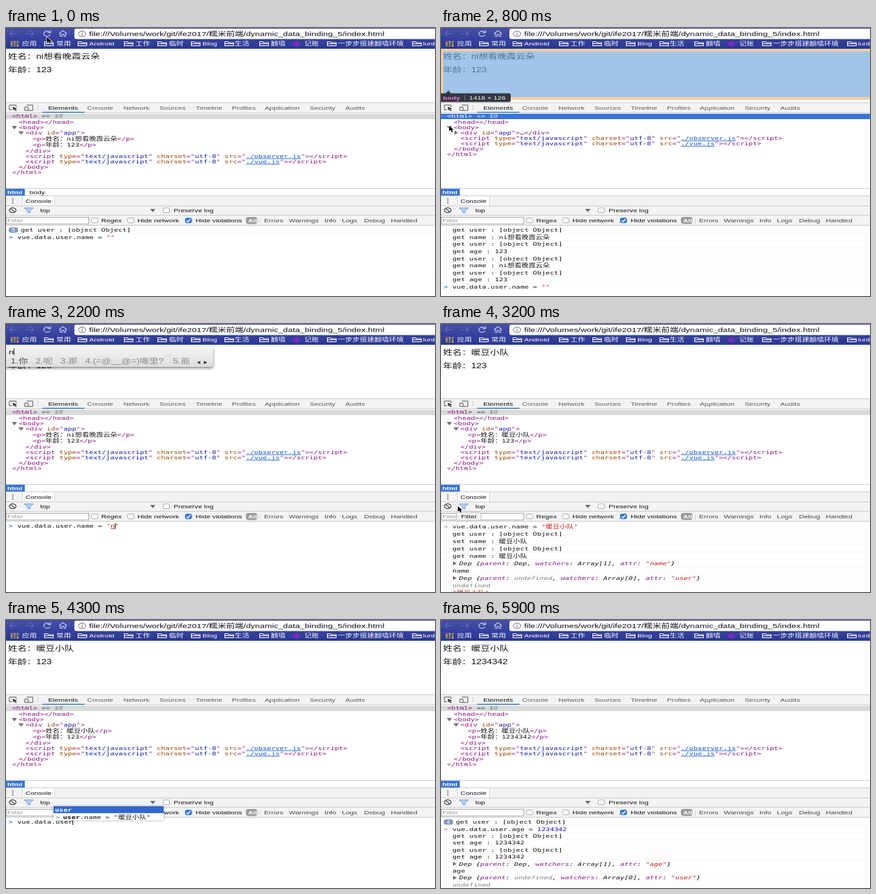
These frames come from a looping animation (640 px wide and 400 px high, 6 s). An HTML page with a canvas:

```html
<!DOCTYPE html>
<html lang="zh-CN">
<head>
<meta charset="utf-8">
<title>Data binding demo</title>
<style>
html, body { margin: 0; width: 100%; height: 100%; overflow: hidden; background: #fff; }
canvas { display: block; width: 640px; height: 400px; }
</style>
</head>
<body>
<canvas width="640" height="400"></canvas>
<script>
const ctx = document.querySelector('canvas').getContext('2d');
const LOOP = 6000, STEP = 100;
const WIDEN = 1.4;
const SANS = '"Liberation Sans", "Noto Sans CJK SC", "Noto Sans CJK", sans-serif';
const MONO = '"DejaVu Sans Mono", "Noto Sans CJK SC", "Noto Sans CJK", monospace';
const PURPLE = '#881280', BROWN = '#994500', NAVY = '#1a1aa6', RED = '#c41a16';
const GREY = '#808080', INK = '#111', LINE = '#ccc', BLUE = '#3879d9';
const FIRST_NAME = 'ni想看晚霞云朵', NEW_NAME = '暖豆小队';

// ---- drawing helpers ----
function box(x, y, w, h, color) {
  ctx.fillStyle = color;
  ctx.fillRect(x, y, w, h);
}

function round(x, y, w, h, r, fill, stroke) {
  ctx.beginPath();
  ctx.roundRect(x, y, w, h, r);
  if (fill) { ctx.fillStyle = fill; ctx.fill(); }
  if (stroke) { ctx.strokeStyle = stroke; ctx.lineWidth = 1; ctx.stroke(); }
}

function shape(d, x, y, fill, stroke, width = 1) {
  const path = new Path2D(d);
  ctx.save();
  ctx.translate(x, y);
  if (stroke) { ctx.strokeStyle = stroke; ctx.lineWidth = width; ctx.stroke(path); }
  if (fill) { ctx.fillStyle = fill; ctx.fill(path); }
  ctx.restore();
}

// Draws text centred on y and returns the x where it ends.
function text(s, x, y, color = INK, size = 7.6, font = SANS, style = '') {
  ctx.font = `${style} ${size}px ${font}`;
  ctx.fillStyle = color;
  ctx.save();
  ctx.translate(x, y + size * 0.35);
  ctx.scale(WIDEN, 1);
  ctx.fillText(s, 0, 0);
  ctx.restore();
  return x + ctx.measureText(s).width * WIDEN;
}

// Parts are [text, color, underlined].
function run(parts, x, y, style) {
  for (const [s, color, underlined] of parts) {
    const end = text(s, x, y, color, 7.5, MONO, style);
    if (underlined) box(x, y + 3.6, end - x, 0.8, color);
    x = end;
  }
  return x;
}

const triangle = (x, y, open, color = '#6e6e6e') =>
  shape(open ? 'M-4-2H4L0 3Z' : 'M-2.5-3L3 0L-2.5 3Z', x, y, color);

function checkbox(x, y, on) {
  round(x - 4.5, y - 3.5, 9.5, 7, 2, on ? BLUE : '#fff', on ? BLUE : '#aaa');
  if (on) shape('M-2.5 0L-.5 2L3-2', x, y, null, '#fff', 1.3);
}

function cursor(x, y) {
  shape('M0 0V8L2.4 6.3L4 9.5L5.8 9L4.2 5.7H7Z', x, y, '#000', '#fff', 1.2);
}

// ---- browser ----
function folder(x) {
  shape('M.5 7V1H5L6.5 2.5H13.5V7ZM.5 4H13.5', x, 19.5, null, '#fff', 1.1);
}

function browserBar() {
  const bar = ctx.createLinearGradient(0, 0, 0, 31);
  bar.addColorStop(0, '#4650a5');
  bar.addColorStop(0.5, '#3642a0');
  bar.addColorStop(1, '#2b3890');
  box(0, 0, 640, 31, bar);
  shape('M6 0H-5M-1-4L-5 0L-1 4', 11, 8.5, null, '#626cb8', 1.2);
  shape('M-6 0H5M1-4L5 0L1 4', 36, 8.5, null, '#626cb8', 1.2);
  shape('M4.5-2A5 3.8 0 1 0 5 1.5M5.5-5V-1.5H1', 61, 8.5, null, '#c5caef', 1.2);
  shape('M-6 0L0-4.5L6 0M-4-1V4H-1.5V1H1.5V4H4V-1', 85, 8.5, null, '#c5caef', 1.1);
  round(102, 1, 550, 15.5, 3, '#fff');
  shape('M-5.5 0A5.5 4 0 1 0 5.5 0A5.5 4 0 1 0-5.5 0M0-.7V2.4M0-2.5V-1.5', 113.5, 8.7, null, '#666');
  text('file:///Volumes/work/git/ife2017/糯米前端/dynamic_data_binding_5/index.html', 124, 8.7, INK, 9.25);

  const dots = ['#ee6a5f', '#f5bd4f', '#61c454'];
  for (let i = 0; i < 9; i++) box(7 + i % 3 * 4.4, 19.5 + (i / 3 | 0) * 3, 3, 2, dots[(i + (i / 3 | 0)) % 3]);
  const marks = [['应用', 24], ['常用', 75, 57], ['Android', 124, 107], ['工作', 193, 176], ['临时', 243, 226],
    ['Blog', 293, 276], ['生活', 341, 326], ['翻墙', 395, 378], ['记账', 445],
    ['一步步搭建翻墙环境', 495, 479], ['lunB', 622, 606]];
  for (const [label, x, icon] of marks) {
    text(label, x, 23.5, '#fff', 7.8, SANS, '500');
    if (icon) folder(icon);
  }
  ctx.beginPath();
  ctx.ellipse(433, 23.5, 5.5, 4.3, 0, 0, 7);
  ctx.fillStyle = '#6d2fbd';
  ctx.fill();
}

function page(name, age) {
  text('姓名：' + name, 3, 42, INK, 10);
  text('年龄：' + age, 3, 62, INK, 10);
}

function highlight() {
  const margin = 'rgba(246,178,107,.66)';
  box(0, 31, 640, 4, margin);
  box(0, 103, 640, 4, margin);
  box(0, 35, 3, 68, margin);
  box(3, 35, 637, 68, 'rgba(111,168,220,.66)');
  shape('M-6 4L0-2L6 4Z', 11, 95.5, '#333740');
  round(-4, 97.5, 108, 13, 2, '#333740');
  text('body', 3, 104, '#ee78e6', 7.6, SANS, 'bold');
  box(35, 100, 0.8, 8, '#888');
  text('1418 × 126', 42, 104, '#fff', 7.7);
}

function inputMethod(typed) {
  ctx.save();
  ctx.shadowColor = 'rgba(0,0,0,.5)';
  ctx.shadowBlur = 4;
  ctx.shadowOffsetY = 2;
  const bg = ctx.createLinearGradient(0, 34, 0, 64);
  bg.addColorStop(0, '#f6f6f6');
  bg.addColorStop(1, '#dcdcdc');
  round(-3, 34, 312, 30, 3, bg);
  ctx.restore();
  const end = text(typed, 4, 41.5, '#111', 9.5);
  box(end, 36.5, 1, 10, '#000');
  const first = typed === 'n';
  const words = first ? ['你', '呢', '那', '(=@__@=)哪里?', '能'] : ['暖', '暖豆', '暖和', '暖洋洋的日子', '嫩'];
  [7, 44, 81, 118, 249].forEach((x, i) => text(`${i + 1}.${words[i]}`, x, 55.5, i ? '#8c8c8c' : '#555', 10));
  shape('M3-2.5L-2.5 0L3 2.5ZM8-2.5L13.5 0L8 2.5Z', 287, 57.5, '#444');
}

// ---- elements panel ----
const attr = (name, value, link) =>
  [[' ' + name, BROWN], ['="', PURPLE], [value, link ? '#1155cc' : NAVY, link], ['"', PURPLE]];
const open = (tag, ...attrs) => [['<' + tag, PURPLE], ...attrs.flat(), ['>', PURPLE]];
const close = tag => [[`</${tag}>`, PURPLE]];
const plain = (s, color = INK) => [[s, color]];
const script = file => [...open('script', attr('type', 'text/javascript'), attr('charset', 'utf-8'),
  attr('src', file, true)), ...close('script')];

function elementRows(depth, name, age) {
  const rows = [{ x: 19, parts: [...open('head'), ...close('head')] }];
  const app = open('div', attr('id', 'app'));
  const add = (x, parts, arrow) => rows.push({ x, parts, arrow });
  if (!depth) {
    add(19, [...open('body'), ...plain('…'), ...close('body')], 'closed');
  } else {
    add(19, open('body'), 'open');
    if (depth === 1) {
      add(29, [...app, ...plain('…'), ...close('div')], 'closed');
    } else {
      add(29, app, 'open');
      for (const s of ['姓名：' + name, '年龄：' + age]) add(40, [...open('p'), ...plain(s), ...close('p')]);
      add(29, close('div'));
    }
    add(29, script('./observer.js'));
    add(29, script('./vue.js'));
    add(19, close('body'));
  }
  add(9, close('html'));
  return rows;
}

// Chinese glyphs make a row taller.
const rowHeight = parts => parts.some(([s]) => /[\u4e00-\u9fff]/.test(s)) ? 9.3 : 8.1;

function elementsPanel(s) {
  box(0, 112, 640, 15, '#f3f3f3');
  box(0, 111, 640, 1, LINE);
  box(0, 126, 640, 1, LINE);
  shape('M-1 3H-5V-4H5V-1', 10, 119, null, '#555');
  shape('M0-1.5L7 1.5L4 2L6 4.5L4.5 5L2.5 2.5L1 4Z', 10, 119, '#333');
  shape('M-3-4H6V4H-1M-6-1H-1V4H-6Z', 34, 119, null, '#555');
  box(47, 115, 0.8, 8, LINE);
  const tabs = [['Elements', 63], ['Console', 121], ['Network', 175], ['Sources', 229], ['Timeline', 283],
    ['Profiles', 337], ['Application', 386], ['Security', 453], ['Audits', 506]];
  for (const [label, x] of tabs) text(label, x, 119, x === 63 ? INK : '#5a5a5a');
  box(54, 125, 63, 1.4, BLUE);

  if (s.depth >= 0) {
    box(0, 128, 640, 8, s.focused ? '#3874d6' : '#dadada');
    const tag = s.focused ? '#fff' : PURPLE, note = s.focused ? '#cfe0ff' : GREY;
    if (s.fresh) text('…', 0, 130, note, 7);
    const x = run([['<html>', tag], [' == ', s.focused ? '#fff' : '#444']], 9, 131.8);
    run([['$0', note]], x, 131.8, 'italic');
    let top = 136;
    for (const row of elementRows(s.depth, s.name, s.age)) {
      const height = rowHeight(row.parts), y = top + height / 2;
      if (row.arrow) triangle(row.x - 6.5, y, row.arrow === 'open');
      run(row.parts, row.x, y);
      top += height;
    }
  }
  box(0, 239, 640, 1, LINE);
  box(0, 240, 28, 10, '#3874d6');
  text('html', 2, 245, '#fff', 7.6, SANS, 'bold');
  if (s.bodyCrumb) text('body', 35, 245);
}

// ---- console ----
function consoleBars() {
  box(0, 251, 640, 44, '#f3f3f3');
  for (const y of [250, 265, 279, 294]) box(0, y, 640, 1, LINE);
  for (const y of [254.5, 257.5, 260.5]) box(9.3, y, 1.8, 1.4, '#555');
  box(24, 251, 48.5, 14, '#fff');
  box(24, 251, 0.8, 14, LINE);
  box(72, 251, 0.8, 14, LINE);
  text('Console', 29, 258);
  shape('M-5 0A5 3.6 0 1 0 5 0A5 3.6 0 1 0-5 0M-3.4-2.5L3.4 2.5', 10, 272, null, '#444', 1.3);
  shape('M-6-3.5H6L1.5 .5V4L-1.5 3V.5Z', 34, 272, '#bcd3f5', BLUE, 1.2);
  text('top', 51, 272);
  triangle(219, 272, true);
  checkbox(239, 272);
  text('Preserve log', 250, 272);
  box(1, 282, 122.5, 10.5, '#fff');
  ctx.strokeStyle = '#aaa';
  ctx.lineWidth = 1;
  ctx.strokeRect(0.5, 282.5, 123, 10);
  text('Filter', 2, 287.5, '#999');
  const checks = [[132, 'Regex', 142], [186, 'Hide network', 196], [272, 'Hide violations', 283]];
  for (const [x, label, at] of checks) {
    checkbox(x, 287.2, x === 272);
    text(label, at, 287.2);
  }
  round(358, 282, 17, 10.5, 4, '#9a9a9a');
  text('All', 361, 287.2, '#fff', 7.6, SANS, 'bold');
  box(379, 283, 0.8, 9, LINE);
  const levels = [['Errors', 385], ['Warnings', 422], ['Info', 475], ['Logs', 501], ['Debug', 534], ['Handled', 574]];
  for (const [label, x] of levels) text(label, x, 287.2, '#444');
}

const command = src => src.split(/("[^"]*"?|\b\d+)/).filter(Boolean)
  .map(s => [s, s[0] === '"' ? RED : /^\d/.test(s) ? '#1c00cf' : INK]);
const log = s => ({ parts: plain(s) });
const USER = 'get user : [object Object]';

function dep(parent, count, name) {
  const key = s => [s, '#881391'];
  return { dep: true, parts: [['Dep {', INK], key('parent'), [': ', INK],
    [parent, parent === 'Dep' ? INK : GREY], [', ', INK], key('watchers'), [`: Array[${count}], `, INK],
    key('attr'), [': ', INK], [`"${name}"`, RED], ['}', INK]] };
}

const result = (key, shown, typed) => [
  { mark: '>', parts: command(`vue.data.user.${key} = ${typed}`) },
  log(USER), log(`set ${key} : ${shown}`), log(USER), log(`get ${key} : ${shown}`),
  dep('Dep', 1, key), log(key), dep('undefined', 0, 'user'),
  { parts: plain('undefined', GREY) }, { mark: '<', parts: command(typed) }];

const userCount = count => ({ badge: count > 1 ? count : 0, parts: plain(USER) });

function consoleRows(s) {
  let y = s.top || 301.5;
  for (const { mark, badge, dep, parts } of s.rows) {
    box(0, y + 5, 640, 0.5, '#f0f0f0');
    if (mark) text(mark, 4, y, GREY, 7.5, MONO);
    if (badge) {
      round(4, y - 4, 14, 8, 4, '#8097bd');
      text(badge, 8, y, '#fff', 7.2);
    }
    if (dep) triangle(20.5, y, false);
    run(parts, dep ? 27 : badge ? 22 : 17, y, dep ? 'italic' : '');
    y += s.rowHeight || 10.5;
  }
  if (s.typed === undefined) return;
  text('>', 4, y, BLUE, 7.5, MONO, 'bold');
  let x = run(command(s.typed), 17, y);
  if (s.composing) x = run([[s.composing, RED, true]], x, y);
  if (s.caret) box(x, y - 4.5, 1, 9, '#000');
  if (s.tail) run([[s.tail, RED]], x, y);
}

function suggestions() {
  ctx.save();
  ctx.shadowColor = 'rgba(0,0,0,.4)';
  ctx.shadowBlur = 3;
  box(71, 278, 164, 21, '#fff');
  ctx.restore();
  box(71, 278, 164, 10.3, '#3068cf');
  text('user', 73, 283.3, '#fff', 7.5, MONO, 'bold');
  text('>', 74, 294, BLUE, 7.5, MONO);
  const x = text('user', 85, 294, INK, 7.5, MONO, 'bold');
  run(plain(`.name = "${NEW_NAME}"`), x, 294);
}

function tooltip() {
  round(23, 281, 37, 12, 1, '#f1f1f1', '#bbb');
  text('Filter', 30, 287);
}

// ---- timeline ----
const PINYIN = ['n', 'nuan', 'nuandou', 'nuandouxiao', 'nuandouxiaodui'];
const FIRST_LOG = [USER, 'get name : ' + FIRST_NAME, USER, 'get age : 123'];
const TYPING = ['', 'v', 'vue', 'vue.', 'vue.data', 'vue.data.us', 'vue.data.user'];
const AGE = 'vue.data.user.age = 1234342';
const AGE_LENGTHS = [14, 15, 17, 18, 19, 20, 21, 22, 23, 24, 25, 27];
const CURSOR_PATHS = [
  [[0, 61, 14], [3, 61, 14], [7, 12, 146], [8, 12, 146], [9, 21, 153], [10, 21, 153], [13, 9, 268], [14, 9, 268], [15, 110, 330]],
  [[29, 110, 330], [32, 25, 272], [33, 9, 268], [35, 9, 268], [36, 110, 330]]];

function cursorAt(n) {
  for (const path of CURSOR_PATHS) {
    const i = path.findIndex(p => p[0] >= n);
    if (i < 0 || n < path[0][0]) continue;
    const [n1, x1, y1] = path[i], [n0, x0, y0] = path[Math.max(0, i - 1)];
    const k = n1 > n0 ? (n - n0) / (n1 - n0) : 0;
    return [x0 + (x1 - x0) * k, y0 + (y1 - y0) * k];
  }
}

function consoleState(n) {
  const typed = 'vue.data.user.name = "';
  if (n < 2) return { rows: [userCount(5)], typed, tail: '"' };
  if (n < 3) return { rows: [], typed, tail: '"' };
  if (n < 14) return { rows: [...FIRST_LOG, ...FIRST_LOG].map(log), typed, tail: '"', rowHeight: 10.6 };
  if (n < 22) return { rows: [], typed, tail: '"', caret: n > 14 };
  if (n < 27) return { rows: [], typed, composing: PINYIN[n - 22], tail: '"', caret: true };
  if (n < 28) return { rows: [], typed: typed + NEW_NAME, tail: '"', caret: true };
  if (n < 34) return { rows: result('name', NEW_NAME, `"${NEW_NAME}"`), top: 302.5, rowHeight: 10.95 };
  if (n < 44) return { rows: [], typed: TYPING[Math.max(0, n - 37)], caret: true };
  if (n < 56) return { rows: [userCount(Math.min(4, n - 43))], typed: AGE.slice(0, AGE_LENGTHS[n - 44]), caret: true };
  return { rows: [userCount(4), ...result('age', '1234342', '1234342')], rowHeight: 10.4 };
}

function draw(n) {
  const name = n < 28 ? FIRST_NAME : NEW_NAME;
  const age = n < 56 ? '123' : '1234342';
  const loading = n === 2;
  const depth = loading ? -1 : n < 2 || n >= 10 ? 2 : n < 8 ? 0 : 1;
  box(0, 0, 640, 400, '#fff');
  browserBar();
  if (!loading) page(name, age);
  elementsPanel({ depth, name, age, focused: n >= 7 && n < 15, fresh: n < 15, bodyCrumb: n < 2 });
  if (n >= 6 && n <= 10) highlight();
  consoleBars();
  consoleRows(consoleState(n));
  if (n >= 22 && n < 27) inputMethod(PINYIN[n - 22]);
  if (n === 32) tooltip();
  if (n === 43) suggestions();
  const pointer = cursorAt(n);
  if (pointer) cursor(...pointer);
}

const start = performance.now();
function tick() {
  draw(Math.floor((performance.now() - start) % LOOP / STEP));
  requestAnimationFrame(tick);
}
tick();
</script>
</body>
</html>
```
